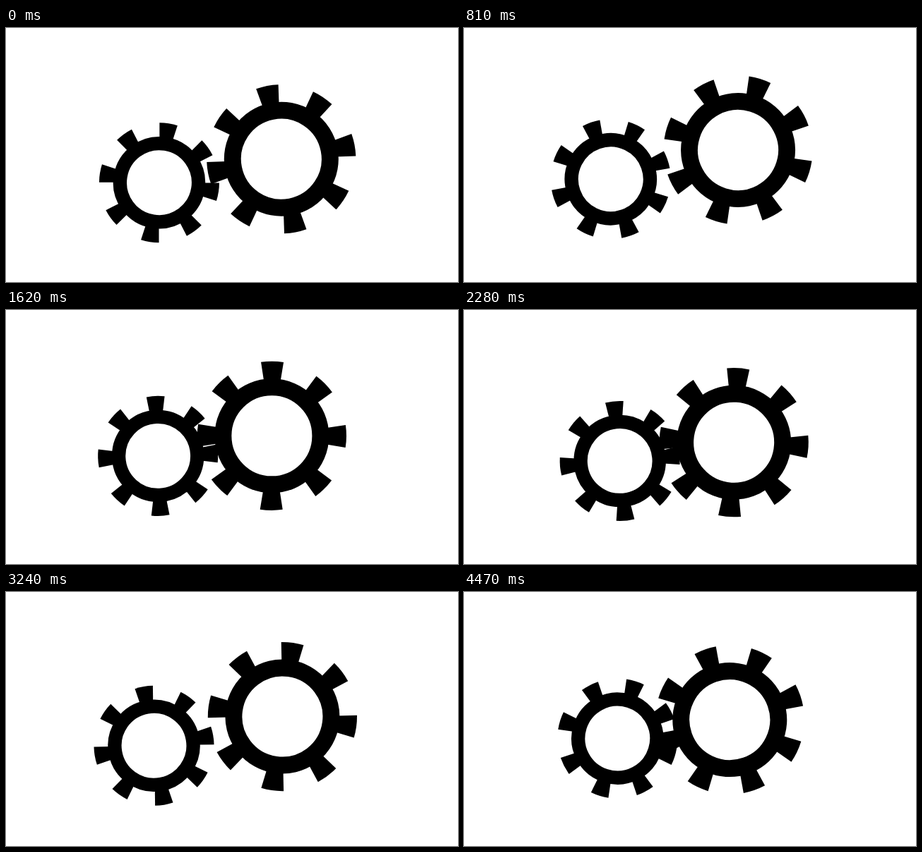
Recreate the animation shown at these times as an HTML page. Size 640 by 360 pixels, loop 4.5 s.

```html
<!DOCTYPE html>
<html lang="en">
<head>
<meta charset="utf-8">
<title>Gears</title>
<style>
  html, body { margin: 0; width: 100%; height: 100%; overflow: hidden; background: #fff; }
  svg { display: block; width: 100vw; height: 100vh; }
</style>
</head>
<body>
<svg viewBox="0 0 640 360">
  <defs>
    <path id="tooth" d="M-11.5 -76 L-16 -104.4 A105.6 105.6 0 0 1 16 -104.4 L11.5 -76 Z"/>
    <g id="gear">
      <circle r="69" fill="none" stroke="#000" stroke-width="24"/>
    </g>
  </defs>
  <use id="small" href="#gear"/>
  <use id="big" href="#gear"/>
</svg>
<script>
const LOOP = 4500, CYCLE = 2700, STEP = 30;
const TURN = 360 / 91; // degrees per step; each cycle ends one step short of a full turn
const TEETH = 8;

// Each gear spins around a pivot slightly off its own centre.
const gears = [
  { id: 'small', x: 214.2, y: 213.3, orbit: 6.5, phase: 65, tilt: 9, dir: 1, scale: 0.805 },
  { id: 'big', x: 384.2, y: 180, orbit: 8, phase: 45.5, tilt: -11, dir: -1, scale: 1 }
];

const shape = document.getElementById('gear');
for (let i = 0; i < TEETH; i++) {
  const tooth = document.createElementNS('http://www.w3.org/2000/svg', 'use');
  tooth.setAttribute('href', '#tooth');
  tooth.setAttribute('transform', `rotate(${i * 360 / TEETH})`);
  shape.append(tooth);
}
for (const g of gears) g.el = document.getElementById(g.id);

function draw(ms) {
  const step = Math.floor((ms % LOOP) % CYCLE / STEP);
  for (const g of gears) {
    const turn = g.dir * step * TURN;
    const a = (g.phase + turn) * Math.PI / 180;
    const x = g.x + g.orbit * Math.cos(a);
    const y = g.y + g.orbit * Math.sin(a);
    g.el.setAttribute('transform',
      `translate(${x} ${y}) rotate(${g.tilt + turn}) scale(${g.scale})`);
  }
}

const start = performance.now();
function tick() {
  draw(performance.now() - start);
  requestAnimationFrame(tick);
}
tick();
</script>
</body>
</html>
```
